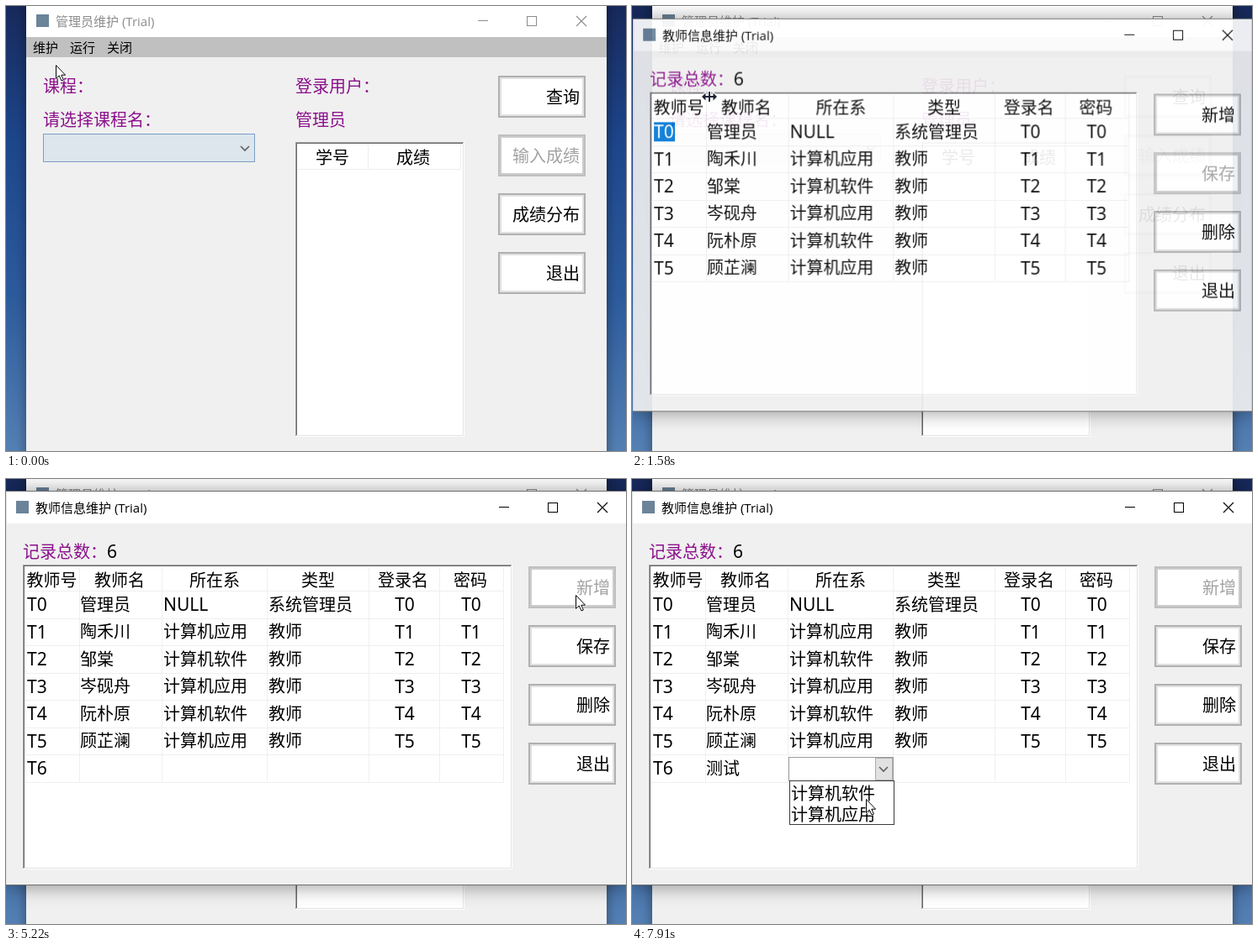
An HTML page with a canvas that plays this animation: 737x530 px, repeating every 8 s.

```html
<!DOCTYPE html>
<html lang="zh-CN">
<head>
<meta charset="utf-8">
<title>教师信息维护</title>
<style>
html, body { margin: 0; width: 100%; height: 100%; overflow: hidden; background: #1f4580; }
canvas { display: block; }
</style>
</head>
<body>
<canvas id="stage" width="737" height="530"></canvas>
<script>
const W = 737, H = 530, LOOP = 8000;
const screen = document.getElementById('stage').getContext('2d');
const layer = document.createElement('canvas');
layer.width = W + 60;
layer.height = H;
const layerCtx = layer.getContext('2d');
let g = screen;

const CJK = '"Noto Sans CJK SC", "Noto Sans CJK JP", sans-serif';
const UI = '15px "Open Sans", ' + CJK;
const FORM = '300 20px ' + CJK;
const LATIN = '21px "Noto Sans", sans-serif';
const PURPLE = '#8b108b';
const BLUE = '#0078d7';

const clamp = v => Math.max(0, Math.min(1, v));
const ramp = (t, a, b) => clamp((t - a) / (b - a));

function box(x, y, w, h, fill) {
  g.fillStyle = fill;
  g.fillRect(x, y, w, h);
}

function frame(x, y, w, h, fill, edge) {
  box(x, y, w, h, edge);
  box(x + 1, y + 1, w - 2, h - 2, fill);
}

function path(points, color, width = 1, close = false) {
  g.beginPath();
  points.forEach(([x, y], i) => i ? g.lineTo(x, y) : g.moveTo(x, y));
  if (close) g.closePath();
  g.strokeStyle = color;
  g.lineWidth = width;
  g.stroke();
}

// cy is the vertical middle of a full-width character
function text(s, x, cy, font = FORM, color = '#000', align = 'left') {
  const size = parseFloat(font.match(/([\d.]+)px/)[1]);
  g.font = font;
  g.fillStyle = color;
  g.textAlign = align;
  g.fillText(s, x, Math.round(cy + size * .375));
}

const chevron = (x, y) => path([[x - 5, y - 2], [x, y + 3], [x + 5, y - 2]], '#606060', 1.6);

function titleBar(title, x, y, right, active) {
  const color = active ? '#000' : '#8c8c8c';
  box(x + 12, y - 7, 15, 15, '#6b8499');
  text(title, x + 35, y + 1, UI, color);
  const close = right - 30, max = close - 59, min = max - 58;
  box(min - 6, y, 12, 1, color);
  g.strokeStyle = color;
  g.lineWidth = 1;
  g.strokeRect(max - 5.5, y - 4.5, 11, 11);
  path([[close - 6, y - 5], [close + 6, y + 7]], color, 1.1);
  path([[close + 6, y - 5], [close - 6, y + 7]], color, 1.1);
}

function button(label, x, y, mode = 'normal') {
  const [edge, ring, ink] = {
    normal: ['#b0b0b0', '#e1e1e1', '#000'],
    off: ['#bfbfbf', '#cccccc', '#a2a2a2'],
    hot: [BLUE, '#e5f1fb', '#000'],
    down: ['#005499', '#cce4f7', '#000']
  }[mode];
  box(x, y, 104, 50, edge);
  box(x + 2, y + 2, 100, 46, ring);
  box(x + 4, y + 4, 96, 42, '#fff');
  text(label, x + 97, y + 25, FORM, ink, 'right');
}

function sunken(x, y, w, h) {
  box(x, y, w, h, '#fff');
  box(x, y, w - 1, 1, '#a0a0a0');
  box(x, y, 1, h - 1, '#a0a0a0');
  box(x + 1, y + 1, w - 3, 1, '#696969');
  box(x + 1, y + 1, 1, h - 3, '#696969');
  box(x + 1, y + h - 2, w - 2, 1, '#e3e3e3');
  box(x + w - 2, y + 1, 1, h - 2, '#e3e3e3');
}

function shadowed(x, y, w, h, blur, alpha, dy, fill) {
  g.save();
  g.shadowColor = `rgba(0,0,0,${alpha})`;
  g.shadowBlur = blur;
  g.shadowOffsetY = dy;
  box(x, y, w, h, fill);
  g.restore();
}

function desktop() {
  const sky = g.createLinearGradient(0, 0, 0, H);
  sky.addColorStop(0, '#17295c');
  sky.addColorStop(.3, '#1d468b');
  sky.addColorStop(.65, '#2c5b9c');
  sky.addColorStop(1, '#5480b4');
  box(0, 0, W, H, sky);
}

function comboFace(edge, fill) {
  frame(44, 152, 252, 34, fill, edge);
}

function mainWindow(t) {
  const active = t >= 370 && t < 1350;
  shadowed(24, -20, 690, 600, active ? 20 : 13, active ? .6 : .4, 2, '#f0f0f0');
  box(24, 0, 690, 37, '#fff');
  titleBar('管理员维护 (Trial)', 24, 17, 714, active);
  box(24, 37, 690, 24, '#c0c0c0');
  const open = t >= 370 && t < 1110;
  if (open) frame(24, 37, 44, 24, '#91aec8', '#2b80c8');
  ['维护', '运行', '关闭'].forEach((s, i) => text(s, 32 + 44 * i, 49, UI));

  text('课程：', 44, 95, FORM, PURPLE);
  text('请选择课程名：', 44, 135, FORM, PURPLE);
  text('登录用户：', 344, 95, FORM, PURPLE);
  text('管理员', 344, 135, FORM, PURPLE);
  comboFace('#bcbcbc', '#e4e4e4');
  g.globalAlpha = 1 - ramp(t, 90, 370);
  comboFace('#7b9fc4', '#dde5ed');
  g.globalAlpha = 1;
  chevron(284, 169);

  sunken(344, 162, 201, 351);
  box(347, 194, 194, 1, '#ededed');
  box(430, 166, 1, 29, '#ededed');
  box(540, 166, 1, 29, '#ededed');
  text('学号', 388, 180, FORM, '#000', 'center');
  text('成绩', 484, 180, FORM, '#000', 'center');
  ['查询', '输入成绩', '成绩分布', '退出'].forEach((s, i) =>
    button(s, 585, 83 + 70 * i, i === 1 ? 'off' : 'normal'));

  const fade = ramp(t, 350, 460) * (1 - ramp(t, 1080, 1200));
  if (fade > 0) {
    g.globalAlpha = fade;
    popup(t);
    g.globalAlpha = 1;
  }
}

function popup(t) {
  box(28, 65, 184, 96, 'rgba(0,0,0,.2)');
  box(28, 65, 182, 94, 'rgba(0,0,0,.3)');
  frame(24, 61, 184, 97, '#c0c0c0', '#a0a0a0');
  box(25, 62, 182, 1, '#e6e6e6');
  box(25, 62, 1, 95, '#e6e6e6');
  const [mx, my] = mouseAt(t);
  const hot = my < 64 ? -1 : Math.floor((my - 64) / 30);
  ['学生表', '教师表', '课程表'].forEach((s, i) => {
    if (i === hot && mx > 27) frame(27, 64 + 30 * i, 178, 30, '#91aec8', BLUE);
    text(s, 77, 79 + 30 * i, UI);
    text('Ctrl+' + 'STC'[i], 141, 78 + 30 * i, UI, '#222');
  });
}

const COLUMNS = [87, 185, 310, 431, 515, 591];
const HEADS = [['教师号', 54.5], ['教师名', 135], ['所在系', 248], ['类型', 371], ['登录名', 472], ['密码', 552]];
const TEACHERS = ['管理员', '陶禾川', '邹棠', '岑砚舟', '阮朴原', '顾芷澜'];
const rowY = i => 149.5 + 32.45 * i;

function teacherWindow(t) {
  const added = t >= 2790;
  shadowed(0, 14, 739, 470, 22, .42, 1, '#f0f0f0');
  frame(0, 14, 739, 470, '#f0f0f0', '#707070');
  box(0, 15, 738, 38, '#fff');
  box(0, 15, 1, 468, '#e4e4e4');
  titleBar('教师信息维护 (Trial)', 0, 33, 739, true);
  text('记录总数：', 20, 86, FORM, PURPLE);
  text('6', 120, 86, LATIN);

  sunken(20, 102, 582, 363);
  const rows = added ? 7 : 6;
  for (let i = 0; i <= rows; i++) box(23, Math.round(133 + 32.5 * i), 569, 1, '#efefef');
  COLUMNS.forEach(x => box(x, 105, 1, 28 + 32.5 * rows, '#efefef'));
  HEADS.forEach(([s, x]) => text(s, x, 120, FORM, '#000', 'center'));

  TEACHERS.forEach((name, i) => {
    const y = rowY(i), id = 'T' + i;
    const picked = i === 0 && !added;
    if (picked) box(25, 138, 25, 23, BLUE);
    text(id, 25, y, LATIN, picked ? '#fff' : '#000');
    text(name, 88, y);
    if (i) text(i % 2 ? '计算机应用' : '计算机软件', 187, y);
    else text('NULL', 187, y, LATIN);
    text(i ? '教师' : '系统管理员', 312, y);
    text(id, 474, y, LATIN, '#000', 'center');
    text(id, 553, y, LATIN, '#000', 'center');
  });

  const over = t >= 2330 && !added;
  const add = added ? 'off' : t >= 2700 ? 'down' : over ? 'hot' : 'normal';
  button('新增', 621, 104, add);
  button('保存', 621, 174, added ? 'normal' : 'off');
  button('删除', 621, 244);
  button('退出', 621, 314);
  if (added) newRow(t);
}

// [from, to, x] while the caret is lit
const CARETS = [[2790, 3350, 25], [3730, 4280, 38], [4370, 4660, 49], [4660, 5220, 89], [6150, 6710, 129]];

function newRow(t) {
  const y = rowY(6);
  if (t >= 3730) text(t >= 4370 ? 'T6' : 'T', 25, y, LATIN);
  if (t >= 6150) text('测试', 88, y);
  for (const [from, to, x] of CARETS) {
    if (t >= from && t < to) box(x, 332, 2, 23, '#000');
  }
  if (t >= 5590 && t < 6150) inputMethod(t);
  if (t >= 7450) dropDown();
}

function inputMethod(t) {
  const typed = t < 5780 ? 'c' : t < 5960 ? 'ces' : t < 6050 ? 'cesh' : 'ceshi';
  text(typed, 88, rowY(6), LATIN);
  const w = g.measureText(typed).width;
  for (let x = 88; x < 88 + w; x += 3) box(x, 355, 1, 1, '#000');
  box(89 + w, 339, 1, 16, '#000');

  const long = typed.length > 1;
  const font = '18px ' + CJK;
  frame(88, 363, long ? 660 : 579, long ? 85 : 52, '#fff', '#c8c8c8');
  const words = long ? ['测试', '侧视', '测时', '侧室', '测', '策', '侧'] : ['才', '从', '次', '此', '处', '成', '出'];
  const step = long ? 90 : 80;
  words.forEach((s, i) => {
    text(i + 1, 104 + step * i, 390, '15px ' + CJK, '#888');
    text(s, 122 + step * i, 389, font, i ? '#000' : BLUE);
  });
  if (long) ['册', '厕', '测试题'].forEach((s, i) => text(s, 122 + step * i, 427, font));
}

function dropDown() {
  frame(186, 331, 125, 29, '#fff', '#9c9c9c');
  frame(289, 332, 21, 27, '#e1e1e1', '#adadad');
  chevron(299, 345);
  frame(187, 359, 125, 53, '#fff', '#3c3c3c');
  text('计算机软件', 189, 374);
  text('计算机应用', 189, 399);
}

const MOUSE = [
  [90, 59, 70], [370, 46, 48], [460, 48, 52], [740, 82, 80], [840, 85, 93], [1100, 92, 108],
  [1780, 92, 108], [2000, 230, 147], [2300, 625, 151], [2420, 677, 138],
  [7000, 677, 138], [7450, 300, 344], [7560, 296, 350], [7820, 278, 379], [7900, 278, 381]
];

function mouseAt(t) {
  const i = MOUSE.findIndex(k => k[0] > t);
  if (i < 0) return MOUSE[MOUSE.length - 1].slice(1);
  if (i === 0) return MOUSE[0].slice(1);
  const [a, ax, ay] = MOUSE[i - 1], [b, bx, by] = MOUSE[i];
  const p = ramp(t, a, b);
  return [ax + (bx - ax) * p, ay + (by - ay) * p];
}

const ARROW = [[.5, .5], [.5, 16.5], [4.2, 13], [7, 19], [9.4, 18], [6.8, 12.2], [11.6, 12.2]];
const half = [[9, 0], [4.5, -4.5], [4.5, -1], [1, -1], [1, -6], [0, -6]];
const flip = (sx, sy) => half.map(([x, y]) => [x * sx, y * sy]);
const RESIZE = [
  ...flip(1, 1), ...flip(-1, 1).reverse(),
  ...flip(-1, -1), ...flip(1, -1).reverse()
];

function cursor(t) {
  if (t >= 3730 && t < 4660) return;
  const [x, y] = mouseAt(t).map(Math.round);
  const resize = t >= 1400 && t < 1800;
  const points = (resize ? RESIZE : ARROW).map(([px, py]) => [x + px, y + py]);
  path(points, '#fff', 2, true);
  g.fillStyle = resize ? '#1c2438' : '#fff';
  g.fill();
  if (!resize) path(points, '#000', 1, true);
}

function draw(t) {
  g = screen;
  desktop();
  mainWindow(t);
  const p = ramp(t, 1370, 1665);
  if (p > 0) {
    g = layerCtx;
    g.clearRect(0, 0, layer.width, H);
    teacherWindow(t);
    g = screen;
    const q = 1 - (1 - p) ** 2, s = .96 + .04 * q;
    g.save();
    g.globalAlpha = q;
    g.translate(369.5, 249);
    g.scale(s, s);
    g.drawImage(layer, -369.5, -249);
    g.restore();
  }
  cursor(t);
}

const start = performance.now();
function tick() {
  draw((performance.now() - start) % LOOP);
  requestAnimationFrame(tick);
}
tick();
</script>
</body>
</html>
```
